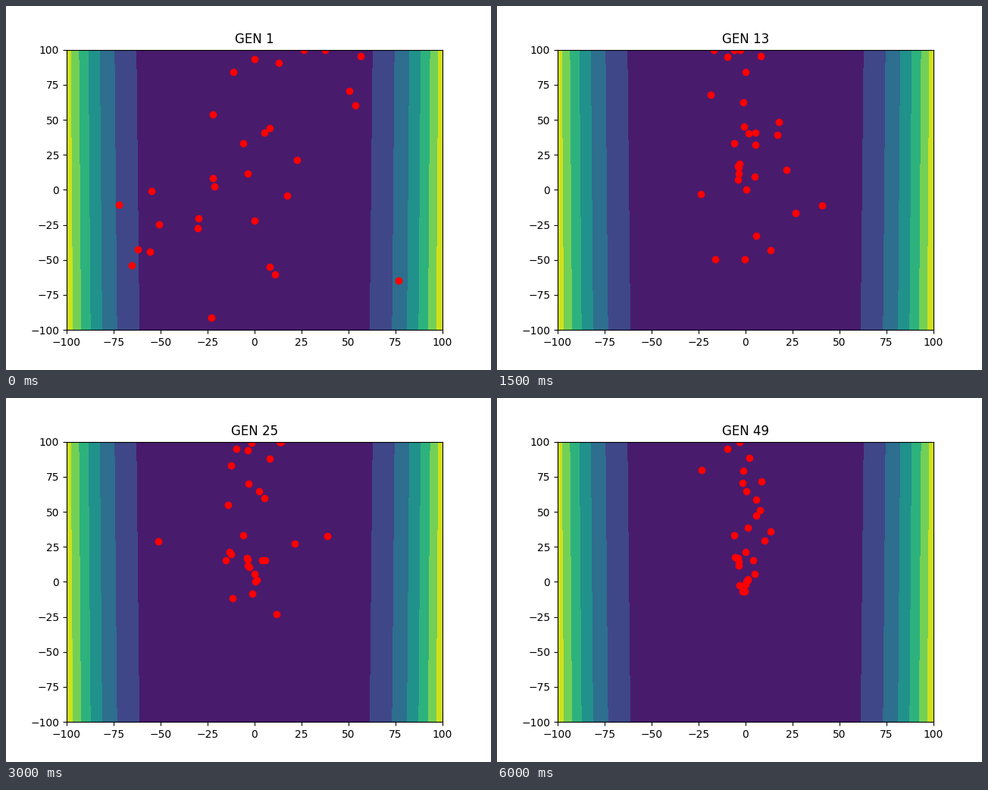
Animation, 640 px wide and 480 px high, one loop 6.5 s. Source, as a matplotlib script:

```python
import numpy as np
import matplotlib.pyplot as plt
from matplotlib.animation import FuncAnimation

STEPS = 13
GENS_PER_STEP = 4
STEP_MS = 500
POPULATION = 30
SURVIVORS = 10
LIMIT = 100

# Strong members found along the way: step, x, y
FINDS = [(3, -3.9, 17), (3, 0.4, 0.2), (5, 1.2, 1.5),
         (8, -3.7, 14.5), (8, 8.5, 71.4)]


def rosenbrock(x, y):
    return (1 - x) ** 2 + 100 * (y - x ** 2) ** 2


def fresh(rng, step, count):
    """New members: the field narrows and its lower edge rises with time."""
    x = rng.normal(0, 34 * 0.86 ** step, count)
    low = -LIMIT * 0.8 ** step
    skew = 1 + 0.07 * step
    y = low + (1.08 * LIMIT - low) * rng.random(count) ** skew
    if step:
        x[0] = rng.uniform(-60, 60)  # one stray mutant
    return np.clip(np.c_[x, y], -LIMIT, LIMIT)


def evolve(seed=4):
    rng = np.random.default_rng(seed)
    members = fresh(rng, 0, POPULATION)
    history = [members]
    for step in range(1, STEPS):
        finds = [(x, y) for first, x, y in FINDS if first == step]
        pool = np.vstack([members, np.reshape(finds, (-1, 2))])
        best = pool[np.argsort(rosenbrock(*pool.T))[:SURVIVORS]]
        members = np.vstack([best, fresh(rng, step, POPULATION - SURVIVORS)])
        history.append(members)
    return history


history = evolve()

fig, ax = plt.subplots(figsize=(6.4, 4.8), dpi=100)
side = np.linspace(-LIMIT, LIMIT, 100)
X, Y = np.meshgrid(side, side)
ax.contourf(X, Y, rosenbrock(X, Y))
dots, = ax.plot([], [], "ro")
ax.set(xlim=(-LIMIT, LIMIT), ylim=(-LIMIT, LIMIT))
title = ax.set_title("GEN 1")


def draw(step):
    dots.set_data(*history[step].T)
    title.set_text(f"GEN {1 + GENS_PER_STEP * step}")
    return dots, title


anim = FuncAnimation(fig, draw, frames=STEPS, interval=STEP_MS,
                     repeat=True, repeat_delay=0, blit=False)
plt.show()
```
